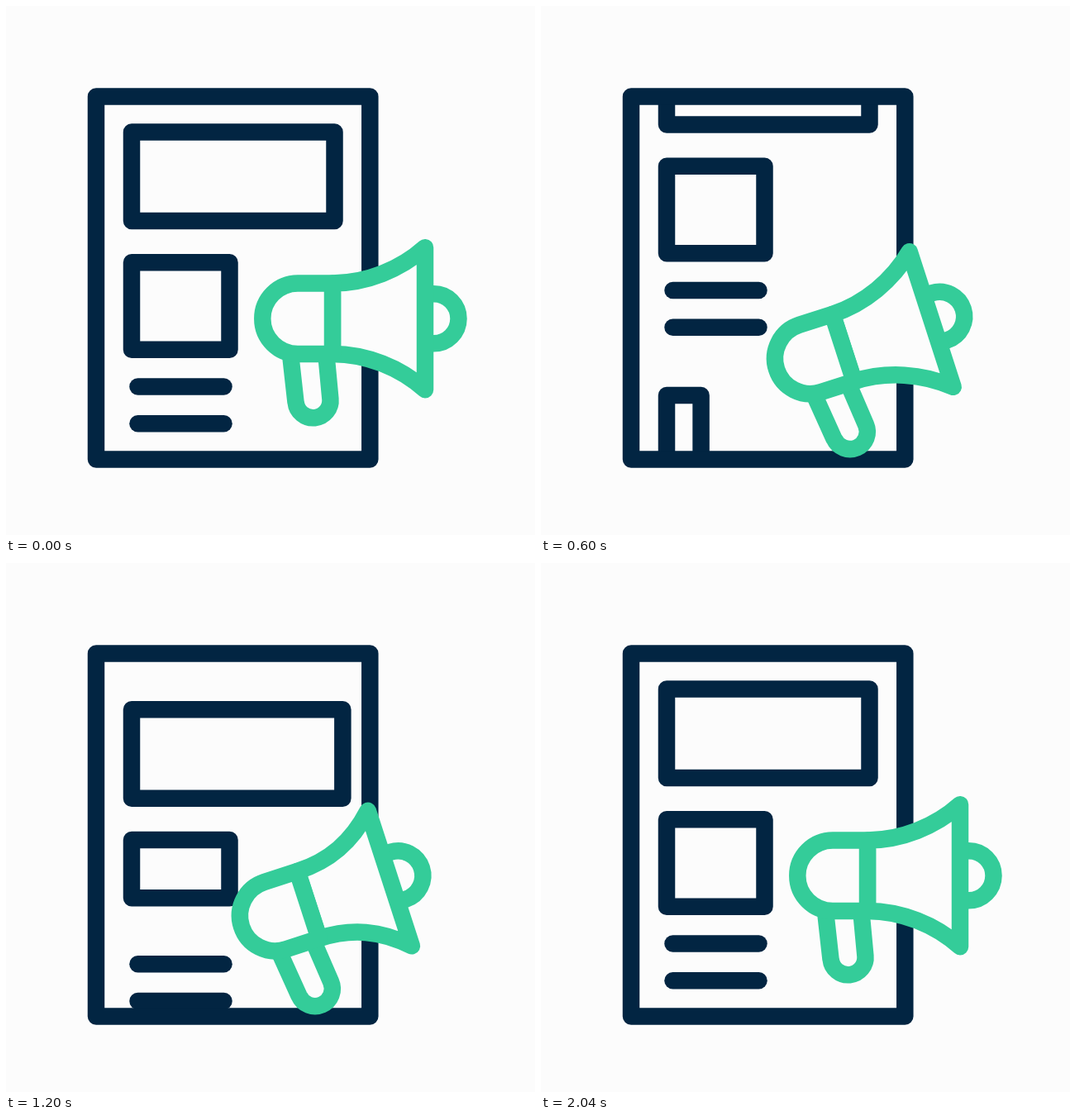
Animation of 640x640 px, one loop 2.42 s. Source, as an HTML page with a canvas:

```html
<!DOCTYPE html>
<html lang="en">
<head>
<meta charset="utf-8">
<title>Newsletter announcement</title>
<style>
  html, body { margin: 0; width: 100%; height: 100%; overflow: hidden; background: #fcfcfc; }
  canvas { display: block; width: 100vmin; height: 100vmin; }
</style>
</head>
<body>
<canvas id="stage" width="640" height="640"></canvas>
<script>
const ctx = document.getElementById('stage').getContext('2d');
const LOOP = 2420;
const NAVY = '#022542', GREEN = '#34cc99', PAPER = '#fcfcfc';
const STROKE = 20.5;
const SCROLL = 435;

// Eased progress from 0 to 1 between times a and b.
function ease(t, a, b) {
  const p = Math.min(1, Math.max(0, (t - a) / (b - a)));
  return p * p * (3 - 2 * p);
}

const mix = (a, b, p) => a + (b - a) * p;

function box(x, y, w, h) {
  ctx.strokeRect(x, y, w, h);
}

function line(x1, y1, x2, y2) {
  ctx.beginPath();
  ctx.moveTo(x1, y1);
  ctx.lineTo(x2, y2);
  ctx.stroke();
}

// One page of the newsletter: headline box, picture box, two text lines.
function article(y, headW, picH) {
  box(152, y + 152.5, headW, 107.5);
  box(152, y + 310.25, 118.5, picH);
  line(159.5, y + 460.5, 263.5, y + 460.5);
  line(159.5, y + 505.3, 263.5, y + 505.3);
}

function drawPage(t) {
  const scroll = SCROLL * ease(t, 205, 1370);
  const headW = mix(24, 258, ease(t, 470, 1250)) - 12.5 * ease(t, 1250, 1690);
  const picH = mix(16, 120, ease(t, 780, 1600)) - 14.5 * ease(t, 1600, 2040);

  ctx.strokeStyle = NAVY;
  ctx.save();
  ctx.beginPath();
  ctx.rect(109, 109.5, 331, 439);
  ctx.clip();
  article(-scroll, 245.5, 105.5);
  article(SCROLL - scroll, headW, picH);
  ctx.restore();
  box(109, 109.5, 331.3, 439);
}

function paint() {
  ctx.fill();
  ctx.stroke();
}

function drawMegaphone(t) {
  const turn = ease(t, 10, 620) - ease(t, 1385, 2000);
  const squeeze = 17.8 * (ease(t, 620, 940) - ease(t, 1000, 1380));
  const mouth = 507 - squeeze;
  const bend = 0.35 * squeeze;

  ctx.strokeStyle = GREEN;
  ctx.fillStyle = PAPER;
  ctx.save();
  ctx.translate(mix(429, 403.1, turn), mix(395, 419.1, turn));
  ctx.rotate(-turn * Math.PI / 10);
  ctx.translate(-429, -395);

  // Handle
  ctx.beginPath();
  ctx.moveTo(344, 421);
  ctx.lineTo(350.5, 479.3);
  ctx.arc(371.5, 477.3, 21, Math.PI - 0.1, -0.1, true);
  ctx.lineTo(387.3, 421);
  paint();

  // Front cap
  ctx.beginPath();
  ctx.moveTo(mouth, 348.2);
  ctx.lineTo(mouth + 10.5, 348.2);
  ctx.arc(mouth + 10.5, 378.2, 30, -Math.PI / 2, Math.PI / 2);
  ctx.lineTo(mouth, 408.2);
  paint();

  // Horn
  ctx.beginPath();
  ctx.moveTo(395, 335.5);
  ctx.bezierCurveTo(436, 335.5, mouth - 30, 319 + bend, mouth, 292.2);
  ctx.lineTo(mouth, 464.2);
  ctx.bezierCurveTo(mouth - 30, 437.4 - bend, 436, 420.9, 395, 420.9);
  ctx.closePath();
  paint();

  // Rear body
  ctx.beginPath();
  ctx.moveTo(395, 335.5);
  ctx.lineTo(353, 335.5);
  ctx.arc(353, 378.2, 42.7, -Math.PI / 2, Math.PI / 2, true);
  ctx.lineTo(395, 420.9);
  ctx.closePath();
  paint();
  ctx.restore();
}

function ray(x1, y1, x2, y2, from, to) {
  line(mix(x1, x2, from), mix(y1, y2, from), mix(x1, x2, to), mix(y1, y2, to));
}

function drawRays(t) {
  const to = ease(t, 620, 1000);
  const from = ease(t, 740, 1085);
  if (to <= 0 || from >= 1) return;
  ctx.strokeStyle = GREEN;
  ray(522.5, 329, 545, 274.5, from, to);
  ray(540, 353, 593.5, 328.5, from, to);
  ray(542.5, 379, 596.5, 401.5, from, to);
}

function draw(t) {
  ctx.fillStyle = PAPER;
  ctx.fillRect(0, 0, 640, 640);
  ctx.lineWidth = STROKE;
  ctx.lineCap = 'round';
  ctx.lineJoin = 'round';
  drawPage(t);
  drawMegaphone(t);
  drawRays(t);
}

const start = performance.now();
function tick() {
  draw((performance.now() - start) % LOOP);
  requestAnimationFrame(tick);
}
tick();
</script>
</body>
</html>
```
